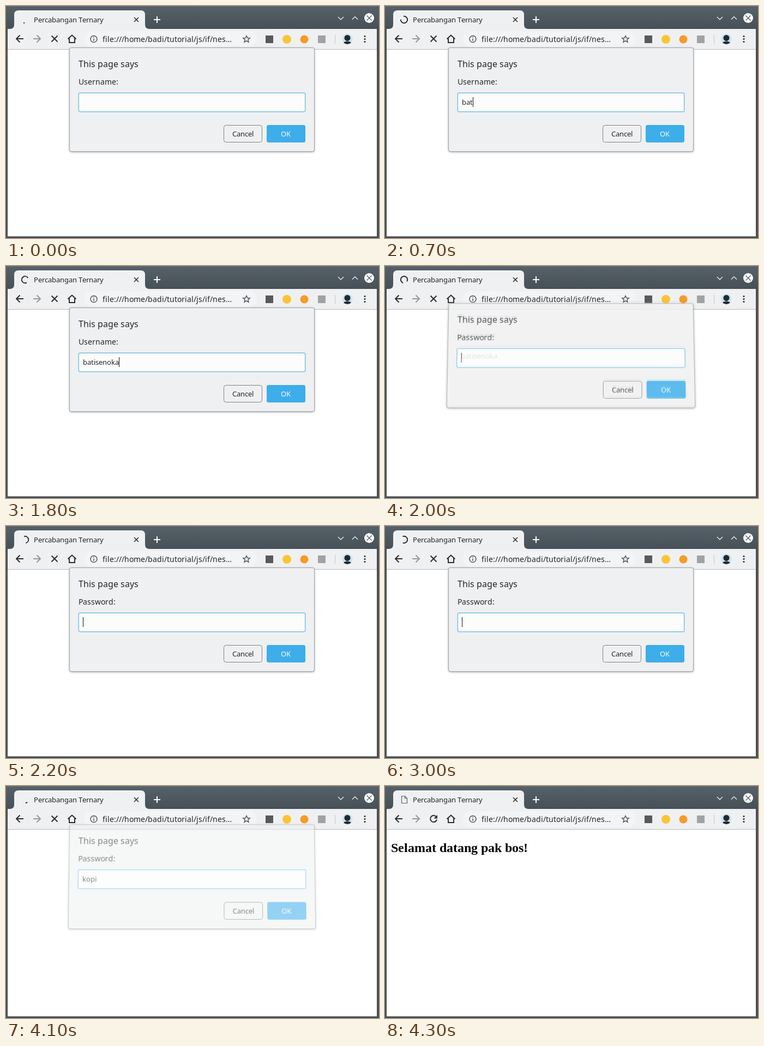
These frames come from a looping animation (684 by 425 pixels, 5.4 s). An HTML page:

```html
<!DOCTYPE html>
<html lang="id">
<head>
<meta charset="utf-8">
<style>
html, body { margin: 0; width: 100%; height: 100%; overflow: hidden; background: #475057; }
svg { position: absolute; left: 0; top: 0; }
text { font-family: "Noto Sans", sans-serif; fill: #232629; }
.line { fill: none; stroke: #2b2e31; stroke-width: 2; }
.dialog { left: 107px; top: 67px; }
.dialog .panel { filter: drop-shadow(0 1.5px 2px rgba(0, 0, 0, .5)); }
</style>
</head>
<body>
<svg width="684" height="425">
  <defs>
    <linearGradient id="bar" x2="0" y2="1">
      <stop stop-color="#566169"/><stop offset="1" stop-color="#475057"/>
    </linearGradient>
  </defs>
  <rect width="684" height="42" fill="url(#bar)"/>
  <path d="M0 .5H684" stroke="#6b757c"/>
  <path d="M7 42Q15 42 15 34V16Q15 8 23 8H247Q255 8 255 16V34Q255 42 263 42Z" fill="#eff0f1"/>
  <rect x="3" y="42" width="677" height="37" fill="#eff0f1"/>
  <rect x="3" y="79" width="677" height="343" fill="#fff"/>
  <path d="M3 79.5H680" stroke="#b9babb"/>

  <text x="51" y="30" font-size="13">Percabangan Ternary</text>
  <path class="line" style="stroke-width:1.6" d="M235 21l8 8m0-8l-8 8"/>
  <path class="line" style="stroke:#fff" d="M271 25h12m-6-6v12"/>
  <g fill="none" stroke="#fcfcfc" stroke-width="1.1">
    <path d="M609 20l5 5 5-5M635 24.500l5-5 5 5"/>
    <circle cx="666" cy="22" r="9" fill="#fcfcfc" stroke="none"/>
    <path d="M661.500 17.500l9 9m0-9l-9 9" stroke="#475057"/>
  </g>

  <path class="line" d="M32 60H19.500m6-6.500L19 60l6.500 6.500"/>
  <path class="line" style="stroke:#96989a" d="M50 60h12.500m-6-6.500L63 60l-6.500 6.500"/>
  <path class="line" id="stop" d="M83.500 54.500l11 11m0-11l-11 11"/>
  <g id="reload">
    <path class="line" d="M94 56.500A6 6 0 1 0 95 61.500"/>
    <path d="M96 53v6.500h-6.500z" fill="#2b2e31"/>
  </g>
  <path class="line" d="M113.500 60.500L121 53.500l7.500 7M116 59v8h10v-8"/>

  <rect x="143" y="46" width="317" height="29" rx="14.500" fill="#f3f4f5"/>
  <g class="line" style="stroke:#55585c;stroke-width:1.5">
    <circle cx="161" cy="60.500" r="6"/>
    <path d="M161 59.500v4.500m0-7.500v1.600"/>
    <path d="M441 54.500l1.800 4 4.400.4-3.300 2.900 1 4.300-3.900-2.300-3.900 2.300 1-4.300-3.300-2.900 4.400-.4z"/>
  </g>
  <text x="177" y="66" font-size="14">file:///home/badi/tutorial/js/if/nes…</text>

  <rect x="476" y="54" width="14" height="14" fill="#58595b"/>
  <circle cx="515" cy="61" r="8" fill="#f9c535"/>
  <circle cx="547" cy="61" r="7.500" fill="#f79a28"/>
  <rect x="572" y="54" width="14" height="14" fill="#a1a2a3"/>
  <path d="M603.500 53v16" stroke="#c3c5c7"/>
  <clipPath id="round"><circle cx="626" cy="60.500" r="9.500"/></clipPath>
  <g clip-path="url(#round)">
    <rect x="616" y="50" width="20" height="21" fill="#c3e6f6"/>
    <circle cx="626" cy="58.500" r="5.500" fill="#26282c"/>
    <ellipse cx="626" cy="70" rx="8" ry="5.500" fill="#26282c"/>
  </g>
  <g fill="#2b2e31">
    <circle cx="658" cy="55.500" r="1.600"/><circle cx="658" cy="60.500" r="1.600"/><circle cx="658" cy="65.500" r="1.600"/>
  </g>

  <path class="line" id="spinner" stroke-linecap="round"/>
  <path class="line" id="doc" style="stroke:#5f6265;stroke-width:1.2" d="M30.500 18.500h6l4 4v9h-10zm6 0v4h4"/>
  <text id="welcome" x="11" y="121" style="font:bold 24px 'Liberation Serif',serif;fill:#000">Selamat datang pak bos!</text>
</svg>

<script>
const LOOP = 5400, STEP = 100, DONE = 4300, ARC = 2000 / 3;
const $ = id => document.getElementById(id);
const clamp = v => Math.max(0, Math.min(1, v));
const show = (el, on) => el.style.display = on ? '' : 'none';
const pen = document.createElement('canvas').getContext('2d');

// Sets text with whole-pixel advances, as hinted desktop fonts do; returns its end.
function setText(el, str) {
  const style = getComputedStyle(el), xs = [];
  pen.font = `${style.fontWeight} ${style.fontSize} ${style.fontFamily}`;
  let x = parseFloat(el.getAttribute('x'));
  for (const ch of str) {
    xs.push(x);
    x += Math.round(pen.measureText(ch).width);
  }
  el.textContent = str;
  if (str) el.setAttribute('x', xs.join(' '));
  return x;
}

function makeDialog(label, value, keyTimes, caretFrom, opens, closes) {
  document.body.insertAdjacentHTML('beforeend', `
  <svg class="dialog" width="468" height="209" viewBox="107 67 468 209">
    <rect class="panel" x="117" y="77" width="448" height="189" rx="3" fill="#eff0f1"/>
    <rect x="116.500" y="76.500" width="449" height="190" rx="3" fill="none" stroke="#a0a2a4"/>
    <text x="133" y="112" font-size="16">This page says</text>
    <text x="133" y="144" font-size="14">${label}</text>
    <rect x="133" y="159" width="416" height="35" rx="3" fill="#fcfcfc" stroke="#3daee9" stroke-opacity=".3" stroke-width="2"/>
    <rect x="133.500" y="159.500" width="415" height="34" rx="2.500" fill="none" stroke="#74bde2"/>
    <text class="value" x="141" y="181" font-size="13"></text>
    <rect class="caret" y="167" width="1" height="18" fill="#111"/>
    <rect x="399.500" y="218.500" width="70" height="31" rx="4" fill="#eff0f1" stroke="#7f8183"/>
    <rect x="478" y="218" width="71" height="32" rx="3.500" fill="#3daee9"/>
    <text x="415" y="239" font-size="13">Cancel</text>
    <text x="504" y="239" font-size="13" style="fill:#fcfcfc">OK</text>
  </svg>`);
  const el = document.body.lastElementChild;
  const text = el.querySelector('.value'), caret = el.querySelector('.caret');
  return t => {
    const shown = clamp((t - opens) / 122), gone = clamp((t - closes) / 225);
    const lift = 44 * (1 - shown) + 13 * gone;
    show(el, shown > 0 && gone < 1);
    el.style.opacity = shown * (1 - gone);
    el.style.transform = lift
      ? `perspective(400px) translateY(${-lift}px) scale(${1 + lift / 1300}) rotateX(${lift * .24}deg)`
      : 'none';
    const end = setText(text, value.slice(0, keyTimes.filter(k => k <= t).length));
    caret.setAttribute('x', end);
    show(caret, t >= caretFrom && t <= closes);
  };
}

const password = makeDialog('Password:', 'kopi', [3300, 3500, 3700, 3800], 0, 1900, 4000);
const username = makeDialog('Username:', 'batisenoka',
  [300, 500, 700, 800, 1000, 1200, 1300, 1500, 1600, 1700], 100, -1000, 1800);

// cubic-bezier(.4, 0, .2, 1)
function ease(x) {
  let lo = 0, hi = 1, s = .5;
  for (let i = 0; i < 20; i++) {
    s = (lo + hi) / 2;
    const at = 1.2 * (1 - s) ** 2 * s + .6 * (1 - s) * s * s + s ** 3;
    if (at < x) lo = s; else hi = s;
  }
  return 3 * (1 - s) * s * s + s ** 3;
}

// The arc grows to 270 degrees, then its tail catches up with its head.
function spinnerPath(t) {
  const n = Math.floor(t / ARC), grown = 270 * ease(t / ARC - n);
  const start = 105 + 360 * t / 1568 + 270 * Math.floor((n + 1) / 2);
  let sweep = n % 2 ? grown - 270 : grown;
  if (Math.abs(sweep) < 5) sweep = n % 2 ? -5 : 5;
  const point = deg => {
    const a = deg * Math.PI / 180;
    return `${35 + 6.2 * Math.cos(a)} ${25 + 6.2 * Math.sin(a)}`;
  };
  return `M${point(start)}A6.2 6.2 0 ${+(Math.abs(sweep) > 180)} ${+(sweep > 0)} ${point(start + sweep)}`;
}

function draw(now) {
  let t = Math.floor(now % LOOP / STEP) * STEP;
  if (t > 2400 && t < 2800) t = 2400;
  const done = t >= DONE;
  username(t);
  password(t);
  $('spinner').setAttribute('d', spinnerPath(t));
  show($('spinner'), !done);
  show($('stop'), !done);
  for (const id of ['doc', 'reload', 'welcome']) show($(id), done);
  requestAnimationFrame(draw);
}

for (const el of document.querySelectorAll('text')) setText(el, el.textContent);
draw(0);
</script>
</body>
</html>
```
